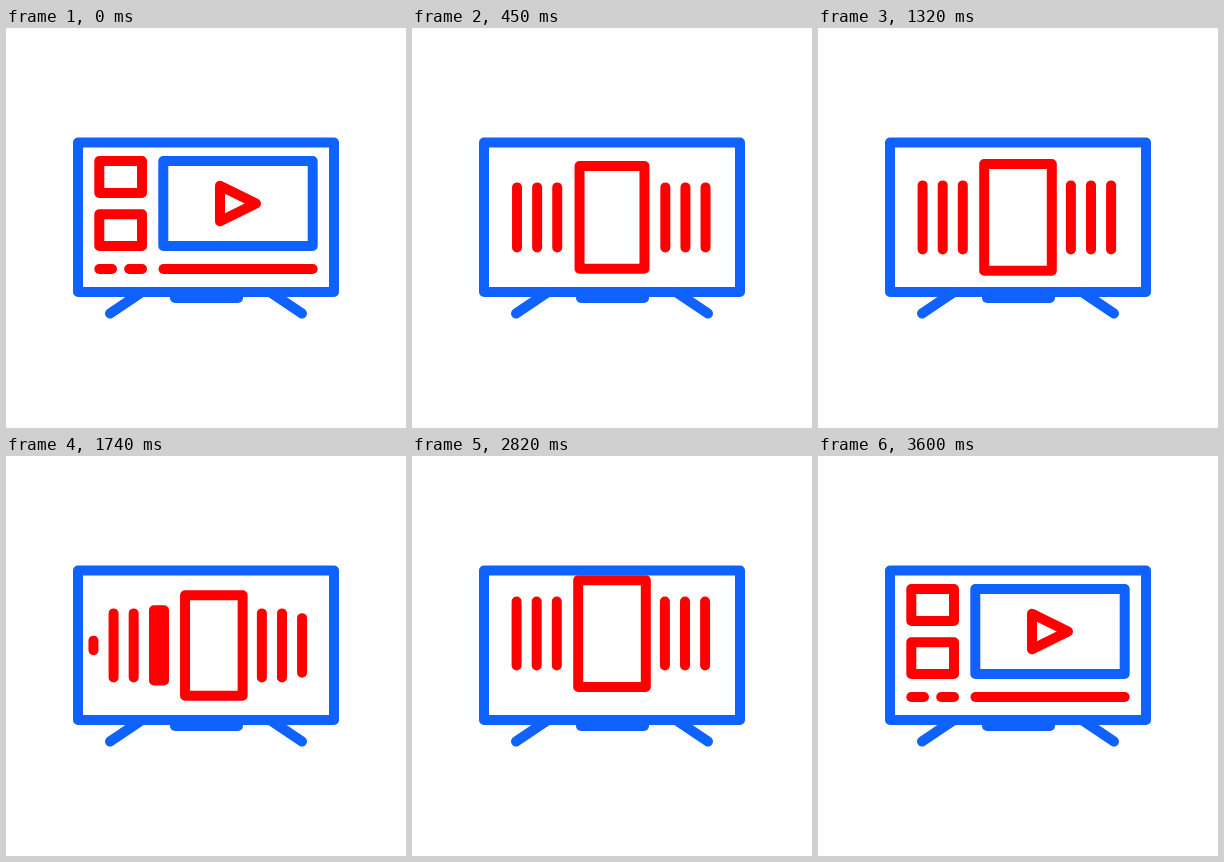
Animation of 400x400 px, one loop 3.63 s. Source, as an HTML page with a canvas:

```html
<!DOCTYPE html>
<html lang="en">
<head>
<meta charset="utf-8">
<title>TV menu</title>
<style>
  html, body { margin: 0; width: 100%; height: 100%; overflow: hidden; background: #fff; }
  canvas { display: block; width: 400px; height: 400px; }
</style>
</head>
<body>
<canvas></canvas>
<script>
const LOOP = 3630, STEP = 30;
const RED = '#ff0000', BLUE = '#0f62fe';
const SCROLL = 150;
const SLIDE_STARTS = [540, 1050, 1560], SLIDE_TIME = 270;
const CENTER_Y = 189.4;

const canvas = document.querySelector('canvas');
const ctx = canvas.getContext('2d');
const ratio = window.devicePixelRatio || 1;
canvas.width = canvas.height = 400 * ratio;

const lerp = (a, b, p) => a + (b - a) * p;
const progress = (t, start, end) => Math.min(1, Math.max(0, (t - start) / (end - start)));
const easeInOut = p => p < 0.5 ? 4 * p ** 3 : 1 - 4 * (1 - p) ** 3;
const ease = (t, start, end) => easeInOut(progress(t, start, end));

const box = (l, t, r, b) => [[l, t], [r, t], [r, b], [l, b]];

function stroke(points, color, closed = true) {
  ctx.beginPath();
  points.forEach(([x, y]) => ctx.lineTo(x, y));
  if (closed) ctx.closePath();
  ctx.strokeStyle = color;
  ctx.stroke();
}

function scaled(x, y, scale, draw) {
  ctx.save();
  ctx.translate(x, y);
  ctx.scale(scale, scale);
  ctx.translate(-x, -y);
  draw();
  ctx.restore();
}

const homeParts = [
  { points: box(93.3, 133, 136, 165), color: RED },
  { points: box(93.3, 186.3, 136, 218), color: RED },
  { points: box(157.3, 133, 306.7, 218), color: BLUE },
  { points: [[214, 157.7], [250, 175.5], [214, 193.3]], color: RED },
  { points: [[93.3, 241], [106, 241]], color: RED, open: true },
  { points: [[123.2, 241], [136, 241]], color: RED, open: true },
  { points: [[157.5, 241], [306.7, 241]], color: RED, open: true }
];

function drawHome(scale) {
  if (scale < 0.01) return;
  for (const { points, color, open } of homeParts) {
    const xs = points.map(p => p[0]), ys = points.map(p => p[1]);
    const cx = (Math.min(...xs) + Math.max(...xs)) / 2;
    const cy = (Math.min(...ys) + Math.max(...ys)) / 2;
    scaled(cx, cy, scale, () => stroke(points, color, !open));
  }
}

// Slot 0 is the open card, slots 1 to 3 on each side are cards seen edge-on.
function slotX(slot) {
  const nearest = slot < 0 ? 144.8 : 252.9;
  const distance = Math.abs(slot);
  return distance < 1
    ? lerp(200, nearest, distance)
    : nearest + Math.sign(slot) * (distance - 1) * 20.1;
}

function drawCarousel(t) {
  const shift = SLIDE_STARTS.reduce((sum, s) => sum + ease(t, s, s + SLIDE_TIME), 0);
  const cardGrow = ease(t, 120, 540), barGrow = ease(t, 180, 540);
  const press = 1 - 0.08 * Math.sin(Math.PI * progress(t, 2280, 2490));

  for (let i = -3; i <= 6; i++) {
    const slot = i - shift;
    const distance = Math.abs(slot);
    if (distance >= 4) continue;
    const open = Math.max(0, 1 - distance);
    const edge = Math.min(1, 4 - distance);
    const halfW = 33.8 * open * cardGrow;
    const halfH = lerp(32 * edge * barGrow, 53.4 * cardGrow, open);
    if (halfH < 0.5) continue;
    const x = slotX(slot) + 7 * (1 - barGrow) * (1 - open);
    const card = box(x - halfW, CENTER_Y - halfH, x + halfW, CENTER_Y + halfH);
    scaled(x, CENTER_Y, lerp(1, press, open), () => stroke(card, RED));
  }
}

function drawTv() {
  stroke(box(72, 114.6, 328, 264), BLUE);
  stroke(box(169, 264, 232, 270), BLUE);
  stroke([[136, 264], [104, 285.5]], BLUE, false);
  stroke([[264, 264], [296, 285.5]], BLUE, false);
}

function drawScreen(t) {
  const scroll = SCROLL * ease(t, 2531, 3600);
  ctx.save();
  ctx.beginPath();
  ctx.rect(77, 119, 246, 140.5);
  ctx.clip();
  if (t < 300) drawHome(1 - ease(t, 0, 300));
  ctx.translate(0, -scroll);
  drawCarousel(t);
  if (scroll > 0) {
    ctx.translate(0, SCROLL);
    drawHome(1);
  }
  ctx.restore();
}

function frame() {
  const t = Math.floor(performance.now() % LOOP / STEP) * STEP;
  ctx.setTransform(ratio, 0, 0, ratio, 0, 0);
  ctx.fillStyle = '#fff';
  ctx.fillRect(0, 0, 400, 400);
  ctx.lineWidth = 10;
  ctx.lineCap = ctx.lineJoin = 'round';
  drawScreen(t);
  drawTv();
  requestAnimationFrame(frame);
}
frame();
</script>
</body>
</html>
```
